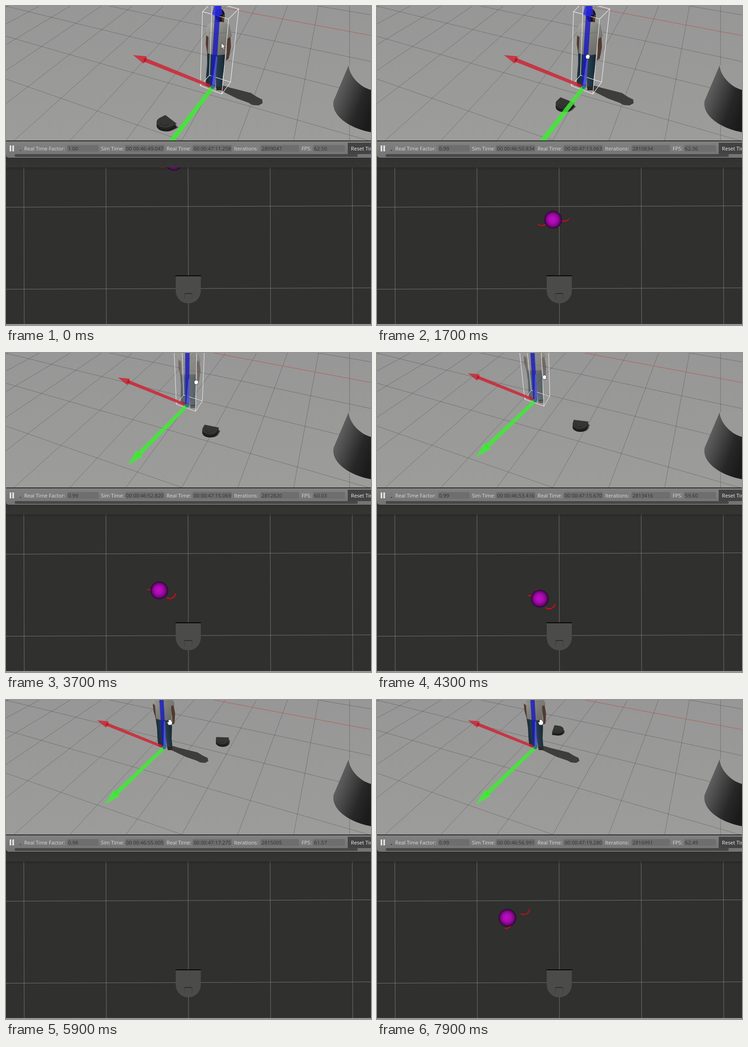
Recreate the animation shown at these times as an HTML page with a canvas. Size 800 by 700 pixels, loop 8 s.

```html
<!DOCTYPE html>
<html lang="en">
<head>
<meta charset="utf-8">
<title>Robot simulation</title>
<style>
html, body { margin: 0; width: 100%; height: 100%; overflow: hidden; background: #30302f }
canvas { display: block }
</style>
</head>
<body>
<canvas id="stage" width="800" height="700"></canvas>
<script>
const c = document.getElementById('stage').getContext('2d');
const LOOP = 8000, STEP = 100, TILT = .62;

// Way points: time, x, y.
const drive = [[0, 350, 257], [900, 366, 249], [1700, 410, 216], [3700, 447, 170],
  [4300, 445, 158], [5900, 474, 90], [6700, 454, 74], [7900, 396, 66]];
const track = [[0, 368, 342], [900, 372, 370], [1700, 386, 469], [2500, 393, 530], [3700, 336, 521],
  [4300, 357, 539], [5900, 140, 740], [6400, 132, 668], [7200, 216, 497], [7900, 286, 478]];

function ramp(t, from, to) {
  const u = Math.min(1, Math.max(0, (t - from) / (to - from)));
  return u * u * (3 - 2 * u);
}

// Smooth curve through way points.
function follow(points, t) {
  const last = points.length - 1;
  let i = 0;
  while (i < last - 1 && points[i + 1][0] <= t) i++;
  const a = points[i], b = points[i + 1], span = b[0] - a[0], u = (t - a[0]) / span;
  const before = points[Math.max(0, i - 1)], after = points[Math.min(last, i + 2)];
  return [1, 2].map(k => {
    const v = (b[k] - before[k]) / (b[0] - before[0]) * span;
    const w = (after[k] - a[k]) / (after[0] - a[0]) * span;
    const d = b[k] - a[k];
    return a[k] + u * (v + u * (3 * d - 2 * v - w + u * (v + w - 2 * d)));
  });
}

const depth = y => .63 + .0021 * y;

// The person is dragged three times; the cursor stays near the grip.
function poseAt(t) {
  const a = ramp(t, 1700, 2400), b = ramp(t, 2700, 3300), d = ramp(t, 3700, 4300);
  const reach = 1 - ramp(t, 0, 900), release = ramp(t, 4400, 4600);
  const x = 453 - 35 * a - 21 * b - 50 * d, y = 178 - 41 * a - 22 * b - 11 * d;
  return {
    x, y, size: depth(y), lean: (x - 393) * .0011,
    cx: x + 9 + 4 * a + 7 * b + 10 * reach - 8 * release,
    cy: y - 67 + 8 * a + 8 * b - 23 * reach - 4 * release
  };
}

function line(x1, y1, x2, y2, color, width) {
  c.strokeStyle = color;
  c.lineWidth = width;
  c.beginPath();
  c.moveTo(x1, y1);
  c.lineTo(x2, y2);
  c.stroke();
}
function shape(d, fill, stroke, width = 1) {
  const p = new Path2D(d);
  if (fill) { c.fillStyle = fill; c.fill(p); }
  if (stroke) { c.strokeStyle = stroke; c.lineWidth = width; c.stroke(p); }
}
function oval(x, y, rx, ry, fill) {
  c.fillStyle = fill;
  c.beginPath();
  c.ellipse(x, y, rx, ry, 0, 0, 7);
  c.fill();
}
function rect(x, y, w, h, fill, r = 0) {
  c.fillStyle = fill;
  c.beginPath();
  c.roundRect(x, y, w, h, r);
  c.fill();
}
function text(s, x, color) {
  c.fillStyle = color;
  c.fillText(s, x, 317);
}
function blend(x1, y1, x2, y2, ...colors) {
  const g = c.createLinearGradient(x1, y1, x2, y2);
  colors.forEach((k, i) => g.addColorStop(i / (colors.length - 1), k));
  return g;
}

function drawGround() {
  rect(0, 0, 800, 296, blend(0, 0, 0, 296, '#979797', '#9c9c9a'));
  const horizon = -373, ink = 'rgba(55,55,55,.5)';
  for (let i = -1; i < 13; i++) line(753 - 68 * i, 0, 753 - 122.7 * i, 296, ink, .8);
  for (let i = -3; i < 7; i++) {
    const slope = 1 / (.002331 - .000269 * i) / 2278;
    line(0, horizon + 1525 * slope, 800, horizon + 2325 * slope, i ? ink : '#c04a4a', .8);
  }
}

function drawCylinder() {
  shape('M751 130C752 152 775 178 800 184V128Z', '#9a9a99');
  shape('M751 130C752 152 775 178 800 184V277C752 268 712 240 718 208Z',
    blend(722, 190, 805, 222, '#626262', '#454545', '#272727', '#1b1b1b'));
}

function drawRobot(t) {
  const [x, y] = follow(drive, t), [px, py] = follow(drive, t - 40), [nx, ny] = follow(drive, t + 40);
  const heading = Math.atan2((ny - py) / TILT, nx - px);
  const layer = (dx, dy, fill) => {
    c.save();
    c.translate(dx, dy);
    c.scale(1, TILT);
    c.rotate(heading);
    shape('M13 -17H0A17 17 0 0 0 0 17H13Z', fill);
    c.restore();
  };
  c.save();
  c.translate(x, y);
  c.scale(depth(y), depth(y));
  layer(3, 5, 'rgba(50,50,50,.8)');
  layer(0, 5, '#1a1a1a');
  layer(0, 2, '#222');
  layer(0, -2, '#353534');
  c.strokeStyle = '#1b1b1b';
  c.beginPath();
  c.ellipse(-2, 0, 7, 4.5, 0, .2, 3.3);
  c.stroke();
  c.restore();
}

function drawPerson(ghost) {
  c.save();
  if (ghost) c.globalAlpha = .5;
  else shape('M466 174Q478 174 490 179L514 185 537 191Q549 200 561 205L562 213 553 218 540 217 531 212 506 203 486 193 468 184Z', '#3d3d3c');
  shape('M439 62L447 66 445 90 446 104 441 102 438 84ZM484 66L492 66 493 90 488 116 482 119 484 100Z', '#513a30');
  shape('M441 100H481L480 126 475 155 474 179 460 180 460 150 457 152 453 174 438 169 439 150 441 128Z',
    blend(438, 0, 481, 0, '#172b38', '#2a4353', '#14242f'));
  shape('M439 168L453 172 452 180 438 175ZM461 177L474 176 473 185 461 185Z', '#2e2825');
  shape('M462 30H478V40H462Z', '#4b352b');
  shape('M446 39L463 35 479 36 490 42 495 67 485 72 482 106Q462 111 442 104L444 69 438 64 441 45Z',
    blend(438, 40, 490, 90, '#aaa9a4', '#85857f', '#6d6c68'));
  shape('M446 59Q463 63 483 58', null, 'rgba(60,60,58,.35)');
  oval(469, 21, 10.5, 14, '#17151b');
  shape('M478 18Q482 26 475 34L472 29Z', '#523a30');
  c.restore();
}

function drawArrow(dx, dy, wide, cone, color, dark) {
  const len = Math.hypot(dx, dy), neck = len * (1 - cone), half = wide / 2;
  c.save();
  c.rotate(Math.atan2(dy, dx));
  shape(`M0 ${-half * .8}L${neck} ${-half}V${half}L0 ${half * .8}Z`, color);
  shape(`M${len} 0L${neck} ${-wide}Q${neck - 5} 0 ${neck} ${wide}Z`, color);
  oval(neck, 0, wide * .32, half, dark);
  c.restore();
}

function drawAxes({ x, y, size, lean }) {
  c.save();
  c.translate(x, y);
  drawArrow(-174 * size, -70 * size, 8.5 * size, .15, 'rgba(208,32,48,.8)', 'rgba(190,15,30,.85)');
  c.save();
  c.globalAlpha = .78;
  c.transform(size, 0, -lean, size, 0, 0);
  shape('M-5 0L-6 -250H6L5 0Z', '#1616c4');
  shape('M-2 -5L3 -68 6 -66 5 -5Z', '#5d5dce');
  shape('M-12 -159L0 -215 11 -159Q-1 -152 -12 -159Z', '#2a2ae0');
  c.restore();
  drawArrow(-130, 60 + TILT * y, 11 * size, .19, 'rgba(60,238,50,.84)', 'rgba(50,235,40,.8)');
  oval(0, 0, 4, 4, '#287d76');
  c.restore();
}

const cursors = {
  arrow: 'M0 -7V6L3 3 5 8 7 7 5 2H9Z',
  open: 'M-3 6L-6 0Q-5 -2 -3 0V-5Q-2 -7 -1 -5V-6Q0 -8 1.5 -6V-5Q3 -6 3.5 -4V-2Q5 -3 5.5 -1V2L3.5 6Z',
  closed: 'M-3 5L-5 0Q-4 -3 -2 -4L0 -5 2 -4Q5 -4 4.5 0L3 5Z'
};

function drawScene(t) {
  c.save();
  c.beginPath();
  c.rect(0, 0, 800, 296);
  c.clip();
  drawGround();
  drawCylinder();
  const pose = poseAt(t), { x, y, size, lean } = pose;
  const ghost = (t >= 1800 && t < 2400) || (t >= 2700 && t < 4600);
  const boxed = ghost || t < 1800;
  const far = follow(drive, t)[1] < y;
  if (far) drawRobot(t);
  c.save();
  c.transform(size, 0, .067 - lean, size, x, y);
  c.translate(-453, -178);
  drawPerson(ghost);
  if (boxed) shape('M431 13L488 29 510 7 452 -8ZM426 175L473 193 492 167 446 152ZM431 13L426 175M488 29L473 193M510 7L492 167M452 -8L446 152', null, '#f2f2f2', 1.1);
  c.restore();
  if (!far) drawRobot(t);
  drawAxes(pose);
  c.translate(pose.cx, pose.cy);
  shape(cursors[t < 900 ? 'arrow' : boxed ? 'closed' : 'open'], '#fff', '#222', .8);
  c.restore();
}

function clock(ms) {
  const sec = (ms % 60000 / 1000).toFixed(3).padStart(6, '0');
  return `00 00:${Math.floor(ms / 60000)}:${sec}`;
}

function drawToolbar(t) {
  rect(0, 295, 800, 40, '#2d2d2d');
  rect(0, 297, 806, 36, blend(0, 297, 0, 333, '#818181', '#737373'), [0, 0, 0, 6]);
  rect(8, 306, 3.5, 13, '#e4e4e4');
  rect(14, 306, 3.5, 13, '#e4e4e4');
  rect(30, 316, 3, 1.5, '#333');
  c.font = '11.2px "Open Sans", "Noto Sans", sans-serif';
  const elapsed = t + Math.min(t, STEP);
  const sim = 2809047 + Math.round(elapsed * .993);
  const real = 2831258 + Math.round(elapsed * 1.0028);
  const factor = .99 + .007 * Math.cos(t * Math.PI / 5900);
  const fps = 62.5 - 2.9 * Math.exp(-(((t - 4300) / 1500) ** 2));
  const fields = [
    ['Real Time Factor:', 40, 134, 69, factor.toFixed(2)],
    ['Sim Time:', 208, 261, 86, clock(sim)],
    ['Real Time:', 352, 409, 86, clock(real)],
    ['Iterations:', 500, 558, 84, String(sim)],
    ['FPS:', 648, 673, 70, fps.toFixed(2)]
  ];
  for (const [label, x, fx, w, value] of fields) {
    text(label, x, '#dddddd');
    rect(fx, 305, w, 15, '#6e6e6e', 3);
    text(value, fx + 2, '#303030');
  }
  rect(749, 300, 60, 25, '#434343');
  text('Reset Time', 756, '#f0f0f0');
  rect(19, 325, 752, 6, '#474747', 3);
}

function drawTarget(t) {
  const [x, y] = follow(track, t), swing = ramp(t, 4300, 7900);
  const turn = (-11 + 46 * ramp(t, 2500, 4300) + 107 * swing) * Math.PI / 180;
  // Each leg is scanned on the side facing the sensor.
  c.fillStyle = '#d50c18';
  for (const side of [-25, 25]) {
    const lx = x + 16 * swing + side * Math.cos(turn), ly = y - 5 + side * Math.sin(turn);
    const facing = Math.atan2(610 - ly, 399 - lx), gap = Math.hypot(610 - ly, 399 - lx) / 1100;
    for (let a = -.95; a <= .95; a += gap)
      c.fillRect(lx + 13 * Math.cos(facing + a) - 1, ly + 13 * Math.sin(facing + a) - 1, 2, 2);
  }
  const g = c.createRadialGradient(x - 2, y - 1, 1, x, y, 19.5);
  ['#bd0cc5', '#b40bbb', '#a00aa7', '#75087d', '#28062b'].forEach((k, i) => g.addColorStop(i / 4, k));
  oval(x, y, 19.5, 19.5, g);
}

function drawMap(t) {
  rect(0, 335, 800, 365, '#30302f');
  c.save();
  c.beginPath();
  c.rect(0, 354, 800, 344);
  c.clip();
  for (let x = 39; x < 800; x += 180) line(x, 354, x + 1, 698, '#848484', .8);
  for (const y of [441.5, 621.5]) line(0, y, 800, y - 3, '#848484', .8);
  shape('M372 592H427V625A27.5 27.5 0 0 1 372 625Z', '#4b4b4a');
  line(371.5, 592, 427.5, 592, '#050505', 2);
  shape('M391 644V632Q399 628 408 632V644', null, '#3c3c3c', 1);
  line(391, 631, 408, 631, '#222', 1.3);
  drawTarget(t);
  c.restore();
  rect(0, 335, 800, 19, blend(0, 335, 0, 354, '#323231', '#353534'));
  rect(0, 354, 800, 7, blend(0, 354, 0, 361, 'rgba(25,25,25,.35)', 'rgba(25,25,25,0)'));
  rect(0, 698, 800, 2, '#a2a2a0');
}

const start = performance.now();
function draw(now) {
  const t = Math.floor(Math.max(0, now - start) % LOOP / STEP) * STEP;
  drawScene(t);
  drawMap(t);
  drawToolbar(t);
  requestAnimationFrame(draw);
}
draw(start);
</script>
</body>
</html>
```
